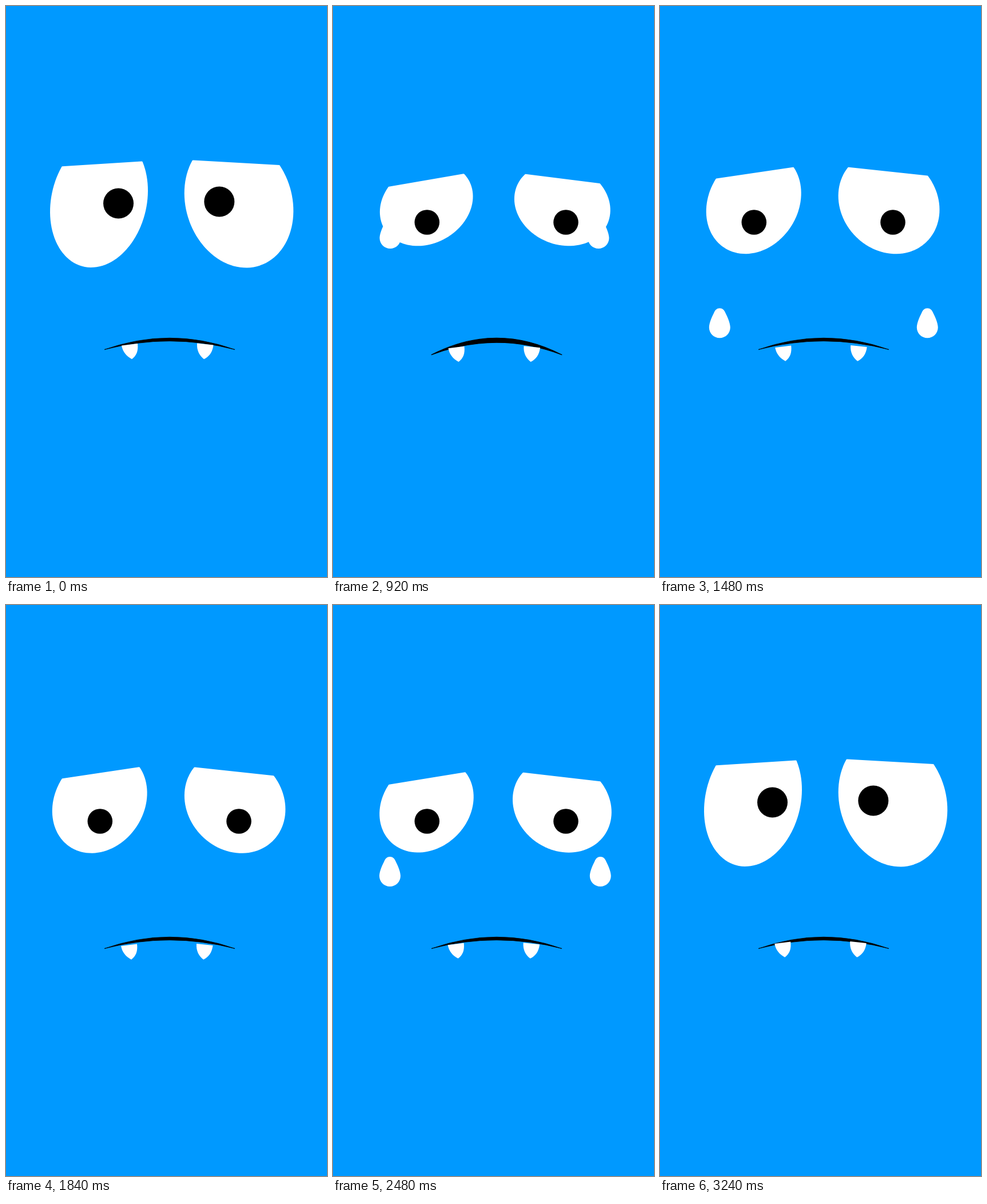
An HTML page that plays this animation: 561 by 998 pixels, repeating every 3.28 s.

```html
<!DOCTYPE html>
<html lang="en">
<head>
<meta charset="utf-8">
<title>Sad face</title>
<style>
  html, body { margin: 0; width: 100%; height: 100%; overflow: hidden; background: #09f; }
  svg { display: block; width: 100%; height: 100%; }
  .eye { stroke: #fff; stroke-width: 3; stroke-linejoin: round; }
  #mouth { fill: #000; stroke: #000; stroke-width: .8; stroke-linejoin: round; }
</style>
</head>
<body>
<svg viewBox="0 0 561 998" fill="#fff">
  <path id="eyeL" class="eye"/>
  <path id="eyeR" class="eye"/>
  <circle id="pupilL" fill="#000"/>
  <circle id="pupilR" fill="#000"/>
  <path id="mouth" d="M172 20.5Q286-20 400 20.5Q286-9.2 172 20.5Z"/>
  <g id="fangs">
    <path d="M202 593.5L230 590C231.5 603 228 611 220 617.2C210 612 204 604 202 593.5Z"/>
    <path d="M334 589.5L362.5 592.5C361 605 355 613 346 617.2C338 611 333 602 334 589.5Z"/>
  </g>
  <path id="tearL" class="tear"/>
  <path id="tearR" class="tear"/>
</svg>
<script>
const LOOP = 3280, STEP = 40;
const $ = id => document.getElementById(id);
const lerp = (a, b, k) => a + (b - a) * k;
const clamp = k => Math.min(1, Math.max(0, k));
const ramp = (from, to, t) => clamp((t - from) / (to - from));
const smooth = k => k * k * (3 - 2 * k);
const rad = deg => deg * Math.PI / 180;

// A slanted ellipse cut off by the lid, which joins the arc's two ends (degrees).
const EYES = {
  L: {
    open:   { cx: 164.5, cy: 348,   rx: 85.5, ry: 116,  slant: -9.3, from: -27.2, to: 220.4 },
    squint: { cx: 163.2, cy: 346.5, rx: 81.3, ry: 72.5, slant: -11,  from: -35.5, to: 215 }
  },
  R: {
    open:   { cx: 399,   cy: 349.5, rx: 95.3, ry: 115,  slant: 7.8,  from: -41.5, to: 211.3 },
    squint: { cx: 400.8, cy: 347,   rx: 83.8, ry: 72,   slant: 8,    from: -38,   to: 218.8 }
  }
};

function eyePath({ open, squint }, k, dx, dy) {
  const e = {};
  for (const p in open) e[p] = lerp(open[p], squint[p], k);
  const points = [], n = 72, edge = 1.5;
  for (let i = 0; i <= n; i++) {
    const a = lerp(e.from, e.to, i / n);
    const x = e.cx + dx + (e.rx - edge) * Math.cos(rad(a));
    const y = e.cy + dy + (e.ry - edge) * Math.sin(rad(a + e.slant));
    points.push(x.toFixed(2) + " " + y.toFixed(2));
  }
  return "M" + points.join("L") + "Z";
}

for (const tear of document.querySelectorAll(".tear"))
  tear.setAttribute("d", "M0 0C-10 0-18.5-8-18.5-18.5C-18.5-27-12-40-10-44C-8-49-5-52 0-52C5-52 8-49 10-44C12-40 18.5-27 18.5-18.5C18.5-8 10 0 0 0Z");

function place(id, x, y, sx = 1, sy = sx) {
  $(id).setAttribute("transform", `translate(${x} ${y}) scale(${sx} ${sy})`);
}

function pupil(id, x, y, r) {
  const c = $(id);
  c.setAttribute("cx", x);
  c.setAttribute("cy", y);
  c.setAttribute("r", r);
}

// three sobs in a row, the eyes opening wide between them
const SOB = 680, SOB_START = 642;
function squintAt(t) {
  const sobs = (t - SOB_START) / SOB;
  return sobs > 0 && sobs < 3 ? 1.05 * Math.abs(Math.sin(Math.PI * sobs)) ** 1.4 : 0;
}

function draw(t) {
  const gaze = 1 - smooth(ramp(0, 320, t)) + smooth(ramp(2730, 3200, t));
  const squint = squintAt(t);
  const raised = smooth(ramp(400, 640, t)) - ramp(1680, 3100, t);
  const lift = 10 * (squint - raised) - 7 * gaze;
  $("eyeL").setAttribute("d", eyePath(EYES.L, squint, -2 * gaze, lift));
  $("eyeR").setAttribute("d", eyePath(EYES.R, squint, 8 * gaze, lift));

  const r = lerp(21.8, 26.5, gaze);
  pupil("pupilL", lerp(164.3, 196.5, gaze), lerp(378, 345, gaze), r);
  pupil("pupilR", lerp(407, 372.8, gaze), lerp(378, 342, gaze), r);

  place("mouth", 0, 580, 1, 1 + .48 * Math.sin(Math.PI * ramp(0, 1480, t)));
  const sink = 4.9 * smooth(ramp(0, 1000, t)) - 6.4 * ramp(1000, 3240, t);
  place("fangs", -1.8 * t / LOOP, sink);

  // two pairs of tears, the first drifting a little to the right
  const second = t > 1800;
  const age = second ? t - 2036 : t - 720;
  const y = 368.2 + .279 * age;
  const size = clamp(age / 140) * clamp((900 - age) / 100);
  const drift = second ? 1 : ramp(200, 760, age);
  place("tearL", second ? 99.5 : lerp(100, 104.3, drift), y, size);
  place("tearR", lerp(464, 467.3, drift), y, size);
}

function tick() {
  const t = performance.now() % LOOP;
  draw(Math.floor(t / STEP) * STEP);
  requestAnimationFrame(tick);
}
tick();
</script>
</body>
</html>
```
